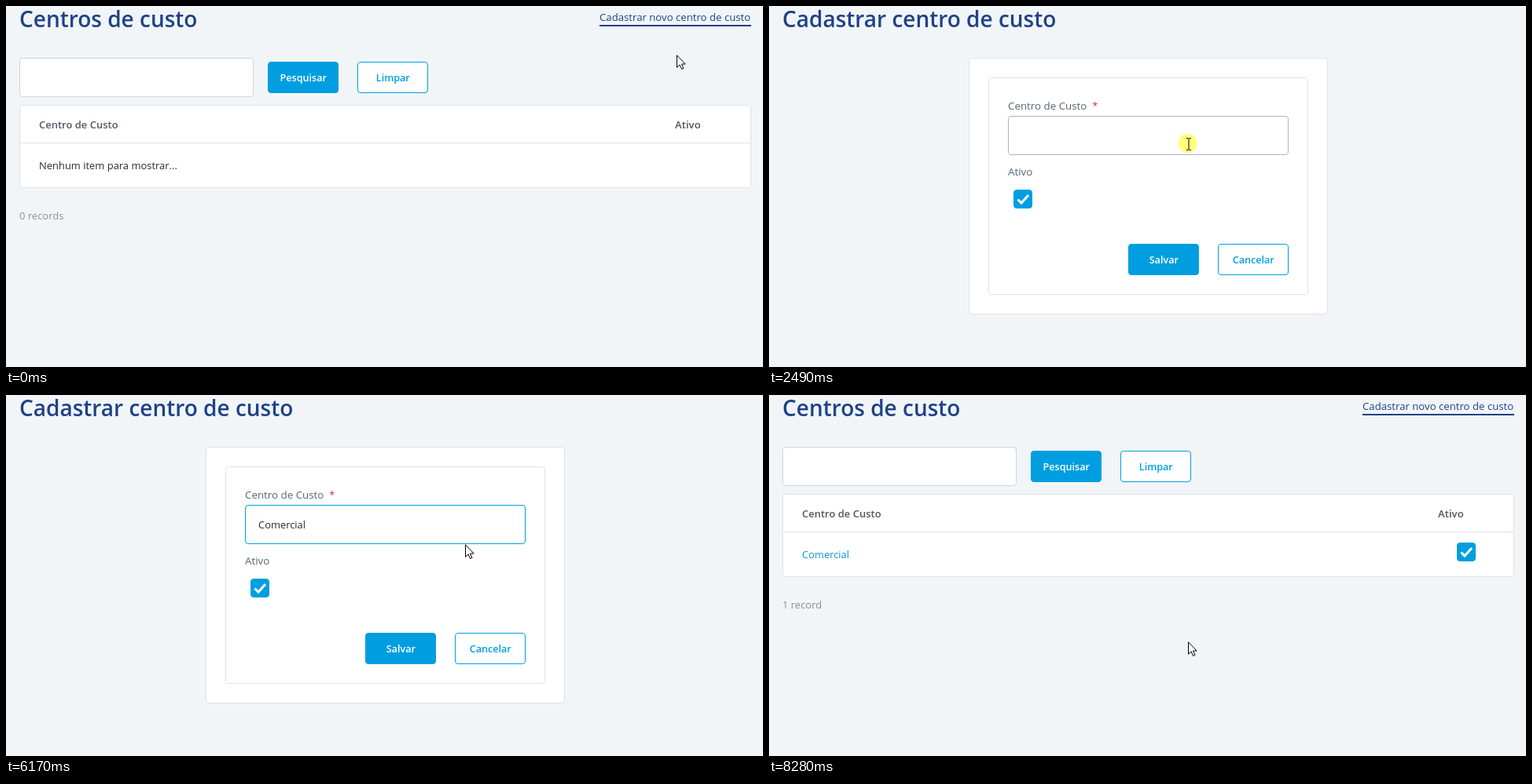
Recreate the animation shown at these times as an HTML page. Size 963 by 460 pixels, loop 8740 ms.

```html
<!DOCTYPE html>
<html lang="pt">
<head>
<meta charset="utf-8">
<style>
  html, body { margin: 0; width: 100%; height: 100%; overflow: hidden; background: #f1f5f8; }
  svg { display: block; width: 963px; height: 460px; }
  text { font-family: "Open Sans", "Noto Sans", sans-serif; white-space: pre; }
</style>
</head>
<body>
<svg id="stage" viewBox="0 0 963 460" xmlns="http://www.w3.org/2000/svg"></svg>
<script>
const LOOP = 8740;
const BLUE = '#009ee0', NAVY = '#1f4287', LINE = '#dee2e6', GREY = '#ced4da';
const stage = document.getElementById('stage');

function add(parent, tag, attrs, content) {
  const node = document.createElementNS(stage.namespaceURI, tag);
  set(node, attrs);
  if (content) node.textContent = content;
  parent.appendChild(node);
  return node;
}
function set(node, attrs) {
  for (const k in attrs) node.setAttribute(k, attrs[k]);
}
const show = (node, on) => set(node, { visibility: on ? 'visible' : 'hidden' });
const group = parent => add(parent, 'g', {});

// One-pixel outlined box given by its outer edges
function box(parent, x, y, w, h, stroke, fill = '#fff') {
  return add(parent, 'rect', { x: x + .5, y: y + .5, width: w - 1, height: h - 1, rx: 3.5, fill, stroke });
}
function label(parent, x, y, content, size, fill, weight = 400, anchor = 'start') {
  return add(parent, 'text', {
    x, y, fill, 'font-size': size, 'font-weight': weight, 'text-anchor': anchor
  }, content);
}
function button(parent, x, y, content, solid) {
  box(parent, x, y, 90, 40, BLUE, solid ? BLUE : '#fff');
  label(parent, x + 45.3, y + 25, content, 12.6, solid ? '#fff' : BLUE, 600, 'middle');
}
function checkbox(parent, x, y) {
  box(parent, x, y, 24, 24, BLUE, BLUE);
  add(parent, 'path', {
    d: `M${x + 5.5} ${y + 12.5}l4.5 4.5l9 -10`, fill: 'none', stroke: '#fff', 'stroke-width': 3
  });
}

// List page
const list = group(stage);
label(list, 17, 27, 'Centros de custo', 28, NAVY, 600);
const link = group(list);
label(link, 755, 19, 'Cadastrar novo centro de custo', 13.2);
add(link, 'rect', { x: 755, y: 24, width: 193, height: 2 });
[...link.children].forEach(n => n.setAttribute('fill', 'inherit'));
box(list, 17, 66, 298, 50, GREY);
button(list, 333, 71, 'Pesquisar', true);
button(list, 447, 71, 'Limpar', false);
box(list, 17, 126, 931, 106, LINE);
add(list, 'rect', { x: 18, y: 174, width: 929, height: 1, fill: LINE });
label(list, 42, 156, 'Centro de Custo', 13, '#4f5861', 600);
label(list, 851, 156, 'Ativo', 13.2, '#4f5861', 600);

const empty = group(list);
label(empty, 42, 208, 'Nenhum item para mostrar...', 12.95, '#272b30');
label(empty, 17, 272, '0 records', 13, '#8b9299');
const filled = group(list);
label(filled, 42, 208, 'Comercial', 12.9, '#0c95cf');
checkbox(filled, 875, 188);
label(filled, 17, 272, '1 record', 13, '#84908f');

// Form page
const form = group(stage);
label(form, 17, 27, 'Cadastrar centro de custo', 28, NAVY, 600);
box(form, 254, 66, 457, 327, LINE);
box(form, 279, 91, 407, 277, LINE);
label(form, 304, 132, 'Centro de Custo', 13.35, '#566576');
label(form, 411.5, 132, '*', 12, '#c0392b');
const field = box(form, 304, 140, 357, 50, GREY);
const entry = label(form, 321, 170, '', 12.9, '#272b30');
const caret = add(form, 'rect', { y: 155, width: 1, height: 19, fill: '#000' });
label(form, 304, 216, 'Ativo', 13.35, '#566576');
checkbox(form, 311, 234);
button(form, 457, 303, 'Salvar', true);
button(form, 571, 303, 'Cancelar', false);

// Pointer shapes, drawn around their hot spot
const pointer = group(stage);
const halo = add(pointer, 'circle', { cx: -.5, cy: 0, r: 12, fill: '#ff0', opacity: .5 });
const shapes = { arrow: group(pointer), hand: group(pointer), beam: group(pointer) };
const ink = { fill: '#fff', stroke: '#000', 'stroke-width': 1, 'stroke-linejoin': 'round' };
add(shapes.arrow, 'path', { ...ink, d: 'M.5 .8V16.3L4.1 12.9L6.6 18.5L8.9 17.5L6.5 12H11.2Z' });
add(shapes.hand, 'path', {
  ...ink,
  d: 'M-2 2.2C-2-.3 2-.3 2 2.2V7.5C3 6.3 5 6.8 5 8.3C6 7.3 8 7.8 8 9.3C9 8.6 10 9.3 10 10.8V15' +
     'C10 17 8.5 18 8.5 20V22.5H-1.5V20.5C-3 18-6 15.5-7 13C-7.4 11.3-5.5 10.8-4.3 12L-2 14Z'
});
add(shapes.hand, 'path', { d: 'M2 7.5V11.5M5 8.3V11.5M8 9.3V12', stroke: '#000', fill: 'none' });
add(shapes.beam, 'path', {
  d: 'M-3 -7.5H-.5M.5 -7.5H3M0 -7V7M-3 7.5H-.5M.5 7.5H3', stroke: '#000', fill: 'none'
});

// Moves: first step, last step, number of steps, destination
const START = [853, 62];
const MOVES = [
  [80, 470, 6, 841, 18],
  [1940, 2250, 5, 534, 176],
  [2940, 3090, 3, 584, 190],
  [6490, 6490, 1, 586, 192],
  [6890, 7190, 5, 540, 306],
  [7270, 7420, 3, 533, 314]
];
const CLICKS = [[620, 780], [2490, 2640], [7590, 7750]];
const KEYS = [3630, 3860, 4090, 4170, 4400, 4870, 5010, 5710, 5790];
const CARET_ON = [[2550, 3020], [3550, 4630], [4870, 5160], [5640, 6170], [6720, 7270]];

const within = (t, spans) => spans.some(([a, b]) => t >= a && t < b);
const ease = p => p * p * (3 - 2 * p);

function position(t) {
  let [x, y] = START;
  for (const [from, to, steps, tx, ty] of MOVES) {
    if (t < from) break;
    const gap = (to - from) / Math.max(1, steps - 1);
    const done = gap ? Math.min(steps, Math.floor((t - from) / gap + 1.01)) : steps;
    const p = ease(done / steps);
    x += (tx - x) * p;
    y += (ty - y) * p;
  }
  return [x, y];
}

function mix(a, b, p) {
  return `rgb(${a.map((v, i) => Math.round(v + (b[i] - v) * p))})`;
}

function render(t) {
  const onForm = t >= 1640 && t < 8280;
  const saved = t >= 8280;
  const [x, y] = position(t);
  const overLink = !onForm && !saved && y < 26;
  const overField = onForm && x > 304 && x < 661 && y > 140 && y < 190;
  const overSave = onForm && x > 457 && x < 547 && y > 303 && y < 343;

  show(list, !onForm);
  show(form, onForm);
  set(list, { display: onForm ? 'none' : 'inline' });
  set(form, { display: onForm ? 'inline' : 'none' });
  set(empty, { display: saved ? 'none' : 'inline' });
  set(filled, { display: saved ? 'inline' : 'none' });
  set(link, { fill: overLink ? '#3580e6' : NAVY });

  const focus = t < 7590 ? Math.min(1, Math.max(0, (t - 2490) / 220)) : Math.max(0, 1 - (t - 7590) / 160);
  const rest = overField ? [173, 181, 189] : [206, 212, 218];
  set(field, { stroke: mix(rest, [0, 158, 224], focus) });

  const typed = 'Comercial'.slice(0, KEYS.filter(k => t >= k).length);
  if (entry.textContent !== typed) entry.textContent = typed;
  const caretOn = onForm && within(t, CARET_ON);
  show(caret, caretOn);
  if (caretOn) set(caret, { x: Math.round(321 + (typed ? entry.getComputedTextLength() : 0)) });

  const shape = overField ? 'beam' : overSave || (overLink && t < 1560) ? 'hand' : 'arrow';
  for (const k in shapes) show(shapes[k], k === shape);
  show(halo, within(t, CLICKS));
  set(halo, { cx: shape === 'beam' ? -1.5 : -.5, cy: shape === 'beam' ? -1 : 0 });
  set(pointer, { transform: `translate(${Math.round(x)} ${Math.round(y)})` });
}

const begin = performance.now();
function tick() {
  render((performance.now() - begin) % LOOP);
  requestAnimationFrame(tick);
}
render(0);
requestAnimationFrame(tick);
</script>
</body>
</html>
```
